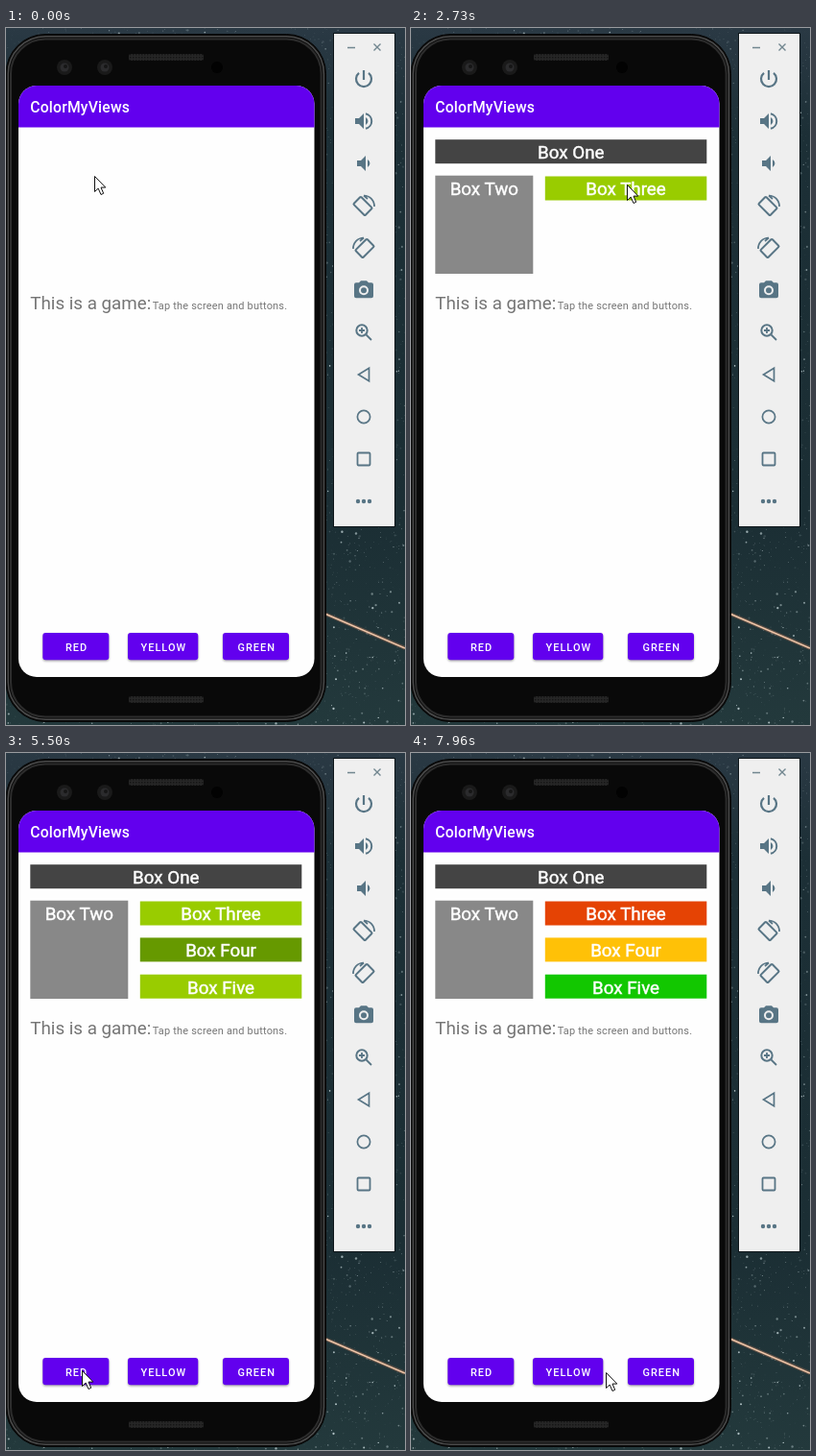
Recreate the animation shown at these times as an HTML page. Size 416 by 726 pixels, loop 8000 ms.

```html
<!DOCTYPE html>
<html lang="en">
<head>
<meta charset="utf-8">
<title>ColorMyViews</title>
<style>
  html, body { margin: 0; width: 100%; height: 100%; overflow: hidden; background: #1d2f35; }
  svg { display: block; width: 100vw; height: 100vh; }
  text { font-family: Roboto, sans-serif; }
  .medium { font-weight: 500; fill: #fff; }
  .box text { font-size: 18.8px; fill: #fff; stroke: #fff; stroke-width: .45; text-anchor: middle; }
  .button text { font-size: 10.97px; letter-spacing: .98px; text-anchor: middle; }
  .icon { fill: none; stroke: #587585; stroke-width: 2; }
  .solid { fill: #587585; stroke: none; }
</style>
</head>
<body>
<svg viewBox="0 0 416 726">
  <defs>
    <linearGradient id="sky" x1="0" y1="0" x2="0" y2="1">
      <stop offset="0" stop-color="#2a3944"/>
      <stop offset=".15" stop-color="#1c2f36"/>
      <stop offset=".7" stop-color="#1b2e34"/>
      <stop offset="1" stop-color="#23393c"/>
    </linearGradient>
    <pattern id="mesh" width="3" height="3" patternUnits="userSpaceOnUse">
      <rect width="3" height="3" fill="#262626"/><rect width="1.5" height="1.5" fill="#151515"/>
    </pattern>
    <clipPath id="screen"><rect x="13" y="60" width="308.5" height="616" rx="19"/></clipPath>
    <filter id="blur" x="-20%" y="-40%" width="140%" height="200%"><feGaussianBlur stdDeviation="1.2"/></filter>
  </defs>

  <rect width="416" height="726" fill="url(#sky)"/>
  <g id="stars" fill="#c3d3d6"></g>
  <path d="M330 609L416 646" stroke="#8a6350" stroke-width="4" opacity=".55"/>
  <path d="M330 609L416 646" stroke="#efc6a8" stroke-width="1.6"/>

  <!-- phone -->
  <rect x="0" y="6.5" width="333.5" height="716" rx="41" fill="#090909" stroke="#090909"/>
  <rect x="2.2" y="8.7" width="329.2" height="711.6" rx="39" fill="none" stroke="#4b4b4b" stroke-width="1.5"/>
  <rect x="5" y="11.5" width="323.6" height="706" rx="36" fill="#090909" stroke="#2c2c2c" stroke-width="2"/>
  <rect x="128" y="27" width="78" height="7" rx="2" fill="url(#mesh)"/>
  <rect x="128" y="696" width="78" height="7" rx="2" fill="url(#mesh)"/>
  <g id="lenses"></g>
  <circle cx="220" cy="41" r="6" fill="#020202"/>

  <g clip-path="url(#screen)">
    <rect x="13" y="60" width="309" height="616" fill="#fefefe"/>
    <rect x="13" y="60" width="309" height="43.5" fill="#6200ee"/>
    <text class="medium" x="25.2" y="88" font-size="15.7" letter-spacing=".22">ColorMyViews</text>
    <g id="boxes"></g>
    <g fill="#757575">
      <text x="25.3" y="293.3" font-size="18.8">This is a game:</text>
      <text x="152.7" y="293.3" font-size="10.97" letter-spacing=".19">Tap the screen and buttons.</text>
    </g>
    <g id="buttons"></g>
  </g>

  <!-- emulator toolbar -->
  <rect x="341.5" y="5.5" width="64" height="514" fill="#efefef" stroke="#0d1519"/>
  <path d="M356 20.5h8M383.5 16.5l7 7M390.5 16.5l-7 7" stroke="#71868f" stroke-width="1.4"/>
  <g id="icons"></g>

  <path id="cursor" d="M0 0V16L3.7 12.6L6.5 19L9.2 17.8L6.5 11.6H11.3Z" fill="#fff" stroke="#111" stroke-width="1"/>
</svg>
<script>
const LOOP = 8000;
const byId = id => document.getElementById(id);
const add = (id, markup) => byId(id).insertAdjacentHTML('beforeend', markup);
const clamp = v => Math.max(0, Math.min(1, v));

let seed = 17;
const random = () => (seed = seed * 16807 % 2147483647) / 2147483647;
let stars = '';
for (let i = 0; i < 7000; i++) {
  const x = random() * 416, y = random() * 726;
  const radius = .3 + random() ** 6 * .9, opacity = .1 + random() ** 2 * .85;
  if (x > 330 || y < 30 || y > 690 || x < 10)
    stars += `<circle cx="${x.toFixed(1)}" cy="${y.toFixed(1)}" r="${radius.toFixed(2)}" opacity="${opacity.toFixed(2)}"/>`;
}
add('stars', stars);

for (const x of [61, 103])
  add('lenses', `<circle cx="${x}" cy="41" r="8" fill="#1a1a1a"/><circle cx="${x}" cy="41" r="4.5" fill="#2b2b2d"/>
    <circle cx="${x + 1}" cy="40" r="2" fill="#161616"/>`);

const phoneTurn = `<rect x="-8.5" y="-5.5" width="17" height="11" rx="1" transform="translate(-1 .5) rotate(45)"/>
  <path d="M0 -10.5A11 11 0 0 1 11 1M0 -10.5L4 -7" stroke-width="1.7"/>`;
const speaker = 'M-9 -3v6h4l5 5V-8l-5 5z';
const icons = [
  '<path d="M0 -9V1M-5 -6.2A8 8 0 1 0 5 -6.2" stroke-width="2.2"/>',
  `<path class="solid" d="${speaker}M2 -4a4.5 4.5 0 0 1 0 8z"/><path d="M2 -7.8a8 8 0 0 1 0 15.6"/>`,
  `<path class="solid" d="${speaker}M2 -4a4.5 4.5 0 0 1 0 8z" transform="translate(2)"/>`,
  phoneTurn,
  `<g transform="scale(-1 1)">${phoneTurn}</g>`,
  `<g transform="translate(0 -.8)"><path class="solid" d="M-3 -9L-5 -7H-8Q-10 -7 -10 -5V7Q-10 9 -8 9H8Q10 9 10 7V-5Q10 -7 8 -7H5L3 -9Z"/>
   <circle cy="1" r="4" stroke="#efefef"/></g>`,
  '<circle cx="-2" cy="-2" r="5.7"/><path d="M2.5 2.5L8 8M-5 -2h6M-2 -5v6" stroke-width="1.8"/>',
  '<path d="M5.5 -6.8V6.8L-5.5 0Z" stroke-width="1.7"/>',
  '<circle r="6.6" stroke-width="1.7"/>',
  '<rect x="-6.5" y="-6.5" width="13" height="13" rx="1" stroke-width="1.8"/>',
  '<path d="M-6 0h0M0 0h0M6 0h0" stroke-width="4.4" stroke-linecap="round"/>'
];
icons.forEach((icon, i) => add('icons', `<g class="icon" transform="translate(373 ${53 + 44 * i})">${icon}</g>`));

// Each box holds its fills as [start time, colour].
const boxes = [
  { name: 'One', x: 25.3, y: 116.2, w: 283, h: 25, fills: [[2000, '#444']] },
  { name: 'Two', x: 25.3, y: 153.7, w: 102, h: 102.3, fills: [[860, '#888']] },
  { name: 'Three', x: 139.8, y: 154.5, w: 168.5, h: 25, fills: [[2730, '#9c0'], [5660, '#e54304']] },
  { name: 'Four', x: 139.8, y: 192.4, w: 168.5, h: 25, fills: [[3360, '#690'], [6430, '#ffc107']] },
  { name: 'Five', x: 139.8, y: 230.7, w: 168.5, h: 25, fills: [[4200, '#9c0'], [7090, '#12c700']] }
];
for (const b of boxes) {
  add('boxes', `<g class="box"><rect x="${b.x}" y="${b.y}" width="${b.w}" height="${b.h}"/>
    <text x="${b.x + b.w / 2}" y="${b.y + 19.9}">Box ${b.name}</text></g>`);
  b.node = byId('boxes').lastElementChild;
}

const buttons = [
  { label: 'RED', x: 38.3, w: 69, press: 5630, touch: 79 },
  { label: 'YELLOW', x: 127, w: 73.3, press: 6400, touch: 163 },
  { label: 'GREEN', x: 226, w: 69, press: 7060, touch: 250 }
];
buttons.forEach((b, i) => {
  const shape = `x="${b.x}" width="${b.w}" height="28.3" rx="3"`;
  add('buttons', `<g class="button">
    <clipPath id="clip${i}"><rect ${shape} y="630"/></clipPath>
    <rect ${shape} y="631.2" filter="url(#blur)" opacity=".35"/>
    <rect ${shape} y="634" filter="url(#blur)" class="lift"/>
    <rect ${shape} y="630" fill="#6200ee"/>
    <circle cy="644" fill="#fff" clip-path="url(#clip${i})"/>
    <text class="medium" x="${b.x + b.w / 2 + .7}" y="648.6">${b.label}</text></g>`);
  const node = byId('buttons').lastElementChild;
  b.lift = node.querySelector('.lift');
  b.ripple = node.querySelector('circle');
});

const smooth = k => k * k * (3 - 2 * k);
const easeOut = k => 1 - (1 - k) ** 2;
// [time, x, y, easing into this point]
const path = [
  [0, 92, 154], [300, 92, 154], [600, 82, 195], [1270, 82, 195], [1300, 83, 183],
  [1760, 124, 124, easeOut], [2030, 124, 124], [2560, 225, 163], [2830, 225, 163],
  [3200, 224, 195], [3500, 224, 195], [4030, 211, 249], [4530, 211, 249],
  [5360, 84, 634], [5380, 84, 634], [5500, 79, 643], [5670, 79, 643],
  [6260, 163, 644], [6425, 163, 644], [6460, 174, 643], [6800, 250, 645, easeOut],
  [7770, 250, 645], [7960, 203, 645], [LOOP, 203, 645]
];

function cursorAt(t) {
  const i = path.findIndex(p => p[0] > t);
  const [t0, x0, y0] = path[i - 1], [t1, x1, y1, ease = smooth] = path[i];
  const k = ease((t - t0) / (t1 - t0));
  return [x0 + (x1 - x0) * k + .5, y0 + (y1 - y0) * k + .5];
}

function draw(t) {
  for (const b of boxes) {
    const fill = b.fills.filter(f => f[0] <= t).pop();
    b.node.style.display = fill ? '' : 'none';
    if (fill) b.node.firstElementChild.setAttribute('fill', fill[1]);
  }
  for (const b of buttons) {
    const age = t - b.press;
    const active = age >= 0 && age < 430;
    const grow = easeOut(clamp(age / 225));
    const fade = active ? clamp((age + 20) / 75) * clamp((430 - age) / 205) : 0;
    b.ripple.setAttribute('cx', b.touch + (b.x + b.w / 2 - b.touch) * grow);
    b.ripple.setAttribute('r', 24 + 20 * grow);
    b.ripple.setAttribute('opacity', .25 * fade);
    b.lift.setAttribute('opacity', .3 * fade);
  }
  byId('cursor').setAttribute('transform', `translate(${cursorAt(t)})`);
}

const start = performance.now();
function tick() {
  draw((performance.now() - start) % LOOP);
  requestAnimationFrame(tick);
}
tick();
</script>
</body>
</html>
```
